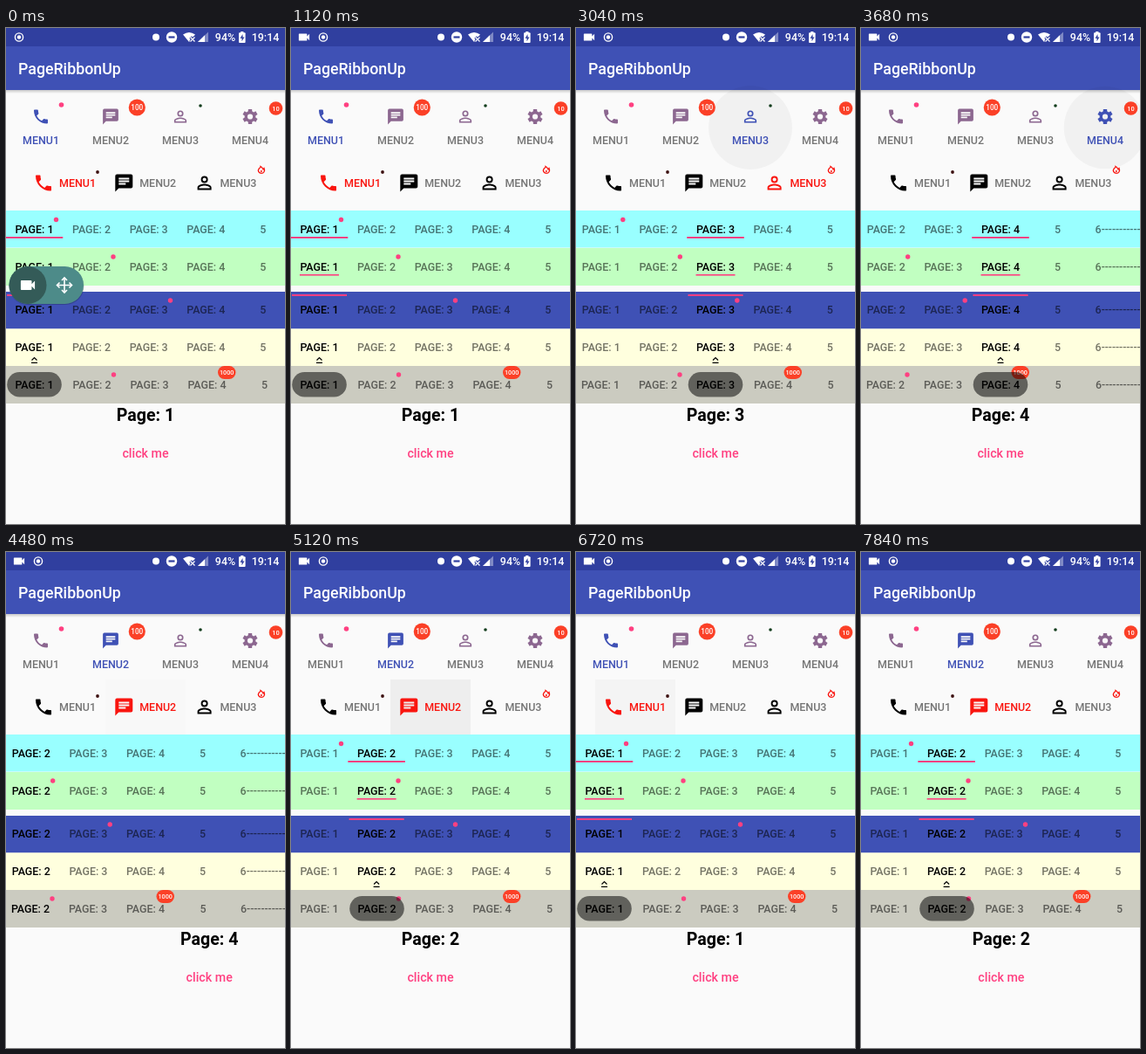
An HTML page for the animation above (8 s loop, 320 by 568 pixels).

```html
<!DOCTYPE html>
<html lang="en">
<head>
<meta charset="utf-8">
<title>Tab strips</title>
<style>
html, body { margin: 0; width: 100%; height: 100%; overflow: hidden; background: #fafafa; }
svg { display: block; width: 320px; height: 568px; }
text { font: 500 12.44px Roboto, "Noto Sans", sans-serif; }
.mid { text-anchor: middle; }
</style>
</head>
<body>
<svg id="stage" viewBox="0 0 320 568"></svg>
<script>
const LOOP = 8000, STEP = 160;
const BLUE = '#3f51b5', PINK = '#ff4081', RED = '#f9150f', BADGE = '#fb4027';

const ICONS = {
  phone: 'M6.62 10.79c1.44 2.83 3.76 5.14 6.59 6.59l2.2-2.2c.27-.27.67-.36 1.02-.24 1.12.37 2.33.57 3.57.57.55 0 1 .45 1 1V20c0 .55-.45 1-1 1-9.39 0-17-7.61-17-17 0-.55.45-1 1-1h3.5c.55 0 1 .45 1 1 0 1.25.2 2.45.57 3.57.11.35.03.74-.25 1.02z',
  chat: 'M20 2H4q-2 0-2 2V22l4-4h14q2 0 2-2V4q0-2-2-2zM6 9h12v2H6zM14 14H6v-2h8zM18 8H6V6h12z',
  person: 'M12 5.9a2.1 2.1 0 1 1 0 4.2a2.1 2.1 0 1 1 0-4.2M12 14.9c2.97 0 6.1 1.46 6.1 2.1v1.1H5.9V17c0-.64 3.13-2.1 6.1-2.1M12 4a4 4 0 1 0 0 8a4 4 0 1 0 0-8zM12 13c-2.67 0-8 1.34-8 4v3h16v-3c0-2.66-5.33-4-8-4z',
  camera: 'M17 10.5V7q0-1-1-1H4q-1 0-1 1v10q0 1 1 1h12q1 0 1-1v-3.5l4 4v-11z',
  gear: gearPath()
};

// start, duration, from, to (zero-based page)
const PAGER = [[1640, 430, 0, 1], [2400, 430, 1, 2], [3120, 430, 2, 3],
  [4468, 500, 3, 1], [6000, 430, 1, 0], [7495, 500, 0, 1]];
const MARKER = [[1720, 490, 0, 1], [2420, 490, 1, 2], [3180, 490, 2, 3],
  [4560, 490, 3, 1], [6130, 490, 1, 0], [7250, 490, 0, 1]];
// menu row, tab, start
const TAPS = [[0, 1, 1600], [0, 2, 2360], [0, 3, 3060], [1, 1, 4440], [1, 1, 5300], [1, 0, 5915]];

const easeOut = p => 1 - (1 - p) ** 5;
const smooth = p => p * p * (3 - 2 * p);
const clamp = v => Math.max(0, Math.min(1, v));

function track(segs, t, ease) {
  let pos = 0;
  for (const [start, dur, from, to] of segs)
    if (t >= start) pos = from + (to - from) * ease(clamp((t - start) / dur));
  return pos;
}

function gearPath() {
  let d = '';
  for (let i = 0; i < 6; i++) {
    for (const [r, deg] of [[7, -30], [7.4, -20], [10, -14], [10, 14], [7.4, 20]]) {
      const a = (i * 60 + deg) * Math.PI / 180;
      d += `${d ? 'L' : 'M'}${(12 + r * Math.sin(a)).toFixed(2)} ${(12 - r * Math.cos(a)).toFixed(2)}`;
    }
  }
  return d + 'zM12 8.5a3.5 3.5 0 1 0 0 7a3.5 3.5 0 1 0 0-7z';
}

const stage = document.getElementById('stage');

function set(node, attrs) {
  for (const k in attrs) node.setAttribute(k, attrs[k]);
  return node;
}
function add(parent, tag, attrs = {}) {
  return parent.appendChild(set(document.createElementNS('http://www.w3.org/2000/svg', tag), attrs));
}
const rect = (p, x, y, width, height, fill, rx = 0) => add(p, 'rect', { x, y, width, height, fill, rx });
const dot = (p, cx, cy, r, fill) => add(p, 'circle', { cx, cy, r, fill });
const shape = (p, d, fill) => add(p, 'path', { d, fill, 'fill-rule': 'evenodd' });
const line = (p, d, stroke, width) => add(p, 'path', { d, stroke, 'stroke-width': width, fill: 'none' });
function label(p, str, x, y, fill, size = 12.44, weight = 500, cls = 'mid') {
  const node = add(p, 'text', { x, y, fill, class: cls, style: `font-size:${size}px;font-weight:${weight}` });
  node.textContent = str;
  return node;
}
function icon(p, name, x, y, scale, fill) {
  return set(shape(p, ICONS[name], fill), { transform: `translate(${x} ${y}) scale(${scale}) translate(-12 -12)` });
}
const show = (node, on) => node.setAttribute('visibility', on ? 'visible' : 'hidden');

// Status bar and toolbar
rect(stage, 0, 0, 320, 568, '#fafafa');
const fade = add(add(stage, 'defs'), 'linearGradient', { id: 'shade', x2: 0, y2: 1 });
add(fade, 'stop', { 'stop-color': '#000', 'stop-opacity': .2 });
add(fade, 'stop', { offset: 1, 'stop-color': '#000', 'stop-opacity': 0 });
rect(stage, 0, 71, 320, 4, 'url(#shade)');
rect(stage, 0, 0, 320, 21, '#303f9f');
rect(stage, 0, 21, 320, 50, BLUE);
label(stage, 'PageRibbonUp', 14, 53, '#fff', 17.78, 500, '');

const statusCam = icon(stage, 'camera', 15, 10.5, .68, '#fff');
const target = add(stage, 'g');
set(dot(target, 0, 10.5, 4.6, 'none'), { stroke: '#fff', 'stroke-width': 1.4 });
dot(target, 0, 10.5, 2.2, '#fff');
dot(stage, 172, 10.5, 4, '#fff');
dot(stage, 190, 10.5, 6.2, '#fff');
rect(stage, 186.5, 9.4, 7, 2.2, '#303f9f');
shape(stage, 'M203 7.5Q210 2.5 217 7.5L210 16z', '#fff');
line(stage, 'M211.5 10.5l5 5m0-5l-5 5', '#303f9f', 3.4);
line(stage, 'M211.5 10.5l5 5m0-5l-5 5', '#fff', 1.2);
shape(stage, 'M220 16H232V4.5z', '#7e88c4');
shape(stage, 'M220 16H228V8.3z', '#fff');
label(stage, '94%', 251.5, 15, '#fff');
rect(stage, 267, 5.3, 7.6, 11.7, '#fff', 1);
rect(stage, 269.2, 4, 3.2, 2, '#fff');
shape(stage, 'M271.5 7l-3 4.8h2v3.4l3-4.8h-2z', '#303f9f');
label(stage, '19:14', 297.5, 15, '#fff');

// Menus
const ripples = TAPS.map(([row, tab]) => row
  ? rect(stage, 22 + tab * 92, 146, 92, 63, '#000')
  : dot(stage, 40 + tab * 80, 114, 0, '#000'));

const menus = [
  { names: ['phone', 'chat', 'person', 'gear'], on: BLUE, off: '#8c6790',
    ix: i => 40 + i * 80, iy: 101.5, scale: .889, tx: i => 40 + i * 80, ty: 132.5 },
  { names: ['phone', 'chat', 'person'], on: RED, off: '#000',
    ix: i => 43 + i * 92.3, iy: 177.5, scale: 1, tx: i => 82 + i * 92.2, ty: 182 }
];
for (const m of menus) {
  m.tabs = m.names.map((name, i) => ({
    icon: icon(stage, name, m.ix(i), m.iy, m.scale, m.off),
    text: label(stage, 'MENU' + (i + 1), m.tx(i), m.ty, '#757575')
  }));
}
dot(stage, 63.5, 88, 2.8, PINK);
dot(stage, 150.3, 91, 9.6, BADGE);
label(stage, '100', 150.3, 94, '#fff', 8.2);
dot(stage, 223, 89, 1.8, '#123d1c');
dot(stage, 309.5, 92, 7.8, BADGE);
label(stage, '10', 309.5, 94.7, '#fff', 7.4);
dot(stage, 105, 165, 1.9, '#3d1212');
line(stage, 'M292 158.5C295 160 294 161.5 295 162L296 160.6C297.5 164 295.5 166.3 293 166.3C290 166.3 288.3 163.5 290.2 161C291 160 292.2 160 292 158.5z', RED, 1.3);
dot(stage, 292.8, 164, 1, RED);

// Page strips
const strips = [
  { y: 209, h: 42.5, fill: '#99ffff', text: 231, mark: 'full', dot: [57.5, 219.5] },
  { y: 252, h: 43, fill: '#c1ffc1', text: 273.5, mark: 'text', dot: [123, 262] },
  { y: 302, h: 42.5, fill: BLUE, text: 323, mark: 'top', dot: [188.5, 312] },
  { y: 344.5, h: 42.5, fill: '#ffffde', text: 366, mark: 'caret' },
  { y: 387, h: 43, fill: '#cbcbc0', text: 408.5, mark: 'pill', dot: [123.5, 397] }
];
const MARKS = {
  full: g => rect(g, -32.8, 239, 65.6, 2, PINK),
  text: g => rect(g, -22.5, 282, 45, 1.6, PINK),
  top: g => rect(g, -31.5, 305, 63, 2, PINK),
  caret: g => line(g, 'M-3 380.5l3-3l3 3M-3.5 383.3h7', '#000', 1.2),
  pill: g => set(rect(g, -31.3, 394, 62.6, 28.5, '#000', 14.25), { opacity: .52 })
};
for (const s of strips) {
  s.pitch = s.mark === 'pill' ? 66 : 65.6;
  s.mid = i => 32.5 + i * s.pitch;
  rect(stage, 0, s.y, 320, s.h, s.fill);
  s.body = add(stage, 'g');
  s.tabs = [0, 1, 2, 3, 4].map(i =>
    label(s.body, i < 4 ? 'PAGE: ' + (i + 1) : '5', s.mid(i), s.text + 4.4, '#000'));
  set(label(s.body, '6' + '-'.repeat(16), s.mid(4) + 43, s.text + 4.4, '#000', 12.44, 500, ''), { opacity: .54 });
  if (s.dot) dot(s.body, ...s.dot, 2.7, PINK);
  if (s.mark === 'pill') {
    rect(s.body, 243, 387, 20.5, 15, BADGE, 7.5);
    label(s.body, '1000', 253.2, 397.2, '#fff', 7.2);
  }
  s.marker = add(s.body, 'g');
  MARKS[s.mark](s.marker);
}

// Pager content
const pages = [1, 2, 3, 4].map(n => {
  const g = add(stage, 'g');
  label(g, 'Page: ' + n, 160, 450, '#000', 19.56, 700);
  label(g, 'click me', 160, 492, PINK, 14.22);
  return g;
});

// Floating recorder control
const recorder = add(stage, 'g');
rect(recorder, 3.5, 274, 86, 43, 'rgba(0,0,0,.2)', 21.5);
rect(recorder, 3.5, 273, 85.5, 43, '#4d8b89', 21.5);
dot(recorder, 25, 294.5, 21.5, '#345b58');
icon(recorder, 'camera', 25, 294.5, .9, '#fff');
line(recorder, 'M59.5 294.5h15M67 287v15', '#fff', 1.6);
line(recorder, 'M64 289l3-3l3 3M64 300l3 3l3-3M61.5 291.5l-3 3l3 3M72.5 291.5l3 3l-3 3', '#fff', 1.6);

function drawRipple(node, [row, , start], t) {
  const age = t - start, out = 1 - clamp((age - 680) / 250);
  show(node, age >= 0 && out > 0);
  if (row) {
    set(node, { opacity: .048 * clamp(age / 300) * out });
  } else {
    set(node, { r: 6 + 42 * Math.sin(clamp(age / 700) * Math.PI / 2), opacity: .036 * out });
  }
}

function draw(t) {
  const page = track(PAGER, t, easeOut);
  const mark = track(MARKER, t, smooth);
  const current = track(PAGER, t, () => 1);

  show(recorder, t < STEP);
  show(statusCam, t >= STEP);
  set(target, { transform: `translate(${t < STEP ? 15 : 37} 0)` });
  ripples.forEach((node, i) => drawRipple(node, TAPS[i], t));

  for (const m of menus) {
    m.tabs.forEach((tab, i) => {
      set(tab.icon, { fill: i === current ? m.on : m.off });
      set(tab.text, { fill: i === current ? m.on : '#757575' });
    });
  }
  for (const s of strips) {
    const x = s.mid(mark);
    set(s.body, { transform: `translate(${-Math.max(0, x - 160)} 0)` });
    set(s.marker, { transform: `translate(${x} 0)` });
    show(s.marker, t < 4468 || t >= 4640);
    s.tabs.forEach((node, i) => set(node, { opacity: i === current ? 1 : .54 }));
  }
  pages.forEach((g, i) => set(g, { transform: `translate(${(i - page) * 320} 0)` }));
}

const begin = performance.now();
function tick() {
  const t = (performance.now() - begin) % LOOP;
  draw(Math.floor(t / STEP) * STEP);
  requestAnimationFrame(tick);
}
tick();
</script>
</body>
</html>
```
